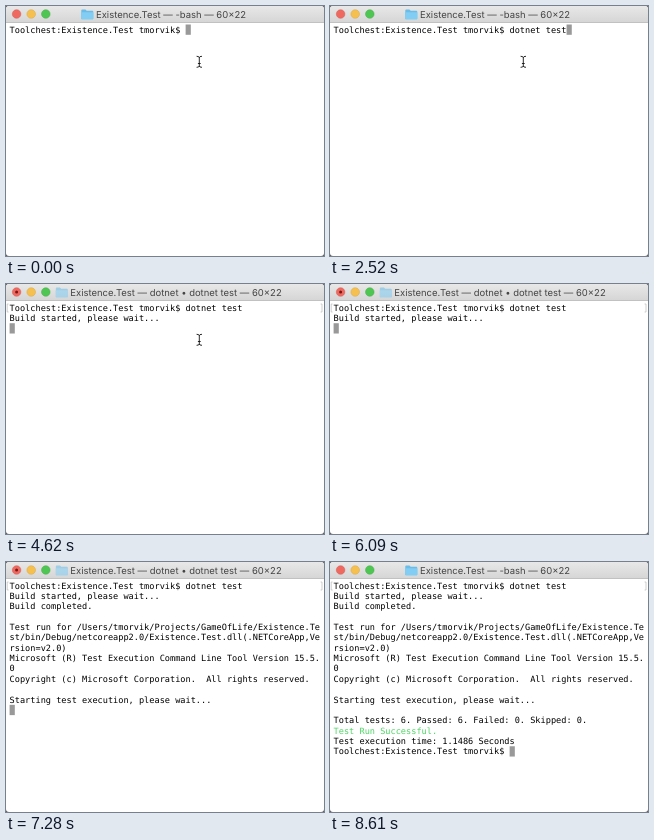
Animation, 318 px wide and 250 px high, one loop 8890 ms. Source, as an HTML page:

```html
<!DOCTYPE html>
<html lang="en">
<head>
<meta charset="utf-8">
<title>Terminal</title>
<style>
  html, body { margin: 0; width: 100%; height: 100%; overflow: hidden; background: #55555a; }
  svg { display: block; }
  text { white-space: pre; text-rendering: geometricPrecision; }
  #screen { font: 8.6px "DejaVu Sans Mono", monospace; fill: #000; }
  #title { font: 9.47px Inter, sans-serif; fill: #444; }
</style>
</head>
<body>
<svg width="318" height="250" viewBox="0 0 318 250">
  <defs>
    <linearGradient id="bar" x2="0" y2="1">
      <stop offset="0" stop-color="#e8e8e8"/>
      <stop offset="1" stop-color="#d6d6d6"/>
    </linearGradient>
    <clipPath id="window"><rect width="318" height="250" rx="3"/></clipPath>
  </defs>
  <g clip-path="url(#window)">
    <rect width="318" height="250" fill="#fff"/>
    <rect width="318" height="16" fill="url(#bar)"/>
    <rect y="16" width="318" height=".8" fill="#b2b2b2"/>
    <g stroke-width=".5">
      <circle cx="10.6" cy="8" r="4.3" fill="#ee6a60" stroke="#d5574e"/>
      <circle cx="25.2" cy="8" r="4.3" fill="#f5c04f" stroke="#dba73e"/>
      <circle cx="39.8" cy="8" r="4.3" fill="#4fc653" stroke="#42ac45"/>
    </g>
    <circle id="busy" cx="10.6" cy="8" r="1.5" fill="#7a1512"/>
    <g id="folder">
      <path d="M0 1.2q0-.9.9-.9h3.3l1.2 1.2h5.7q.9 0 .9.9v6.7q0 .9-.9.9H.9q-.9 0-.9-.9z" fill="#6abde8"/>
      <path d="M0 3h12v6.1q0 .9-.9.9H.9q-.9 0-.9-.9z" fill="#82cdf4"/>
    </g>
    <text id="title" y="11.8"></text>
    <path id="marks" d="M2.6 20H1.2v8H2.6M314.6 20h1.4v8H314.6" fill="none" stroke="#bbb" stroke-width=".7"/>
    <rect id="caret" width="5.2" height="10.3" fill="#999"/>
    <g id="screen"></g>
    <path id="mouse" d="M-2.3-5.5Q0-5.5 0-4.2Q0-5.5 2.3-5.5M0-4.2V4.2M-2.3 5.5Q0 5.5 0 4.2Q0 5.5 2.3 5.5M-1 1.7H1"
      fill="none" stroke="#111" stroke-width=".9" stroke-linecap="round"/>
  </g>
</svg>
<script>
const LOOP = 8890, COLS = 60, CELL = 5.177, ROW = 10.36, LEFT = 3.6, TOP = 18.5;
const PROMPT = 'Toolchest:Existence.Test tmorvik$ ';
const COMMAND = 'dotnet test';
const KEYS = [70, 210, 350, 700, 840, 910, 1260, 1470, 1610, 1750, 2520];
const ENTER = 3150, RUN = 3430, DONE = 8120;
const SUCCESS = 'Test Run Successful.';
const OUTPUT = [
  [4620, 'Build started, please wait...'],
  [6440, 'Build completed.', ''],
  [6510, 'Test run for /Users/tmorvik/Projects/GameOfLife/Existence.Test/bin/Debug/netcoreapp2.0/Existence.Test.dll(.NETCoreApp,Version=v2.0)'],
  [6580, 'Microsoft (R) Test Execution Command Line Tool Version 15.5.0',
         'Copyright (c) Microsoft Corporation.  All rights reserved.', ''],
  [6650, 'Starting test execution, please wait...'],
  [7910, '', 'Total tests: 6. Passed: 6. Failed: 0. Skipped: 0.'],
  [7980, SUCCESS],
  [8050, 'Test execution time: 1.1486 Seconds']
];
const MOVE = { start: 4830, end: 5390, step: 70, from: [193.3, 55.8], to: [283, 148] };

const $ = id => document.getElementById(id);
const show = (el, on) => el.setAttribute('visibility', on ? 'visible' : 'hidden');
const place = (el, x, y) => el.setAttribute('transform', `translate(${x} ${y})`);
const wrap = s => s.match(new RegExp(`.{1,${COLS}}`, 'g')) || [''];

const rows = Array.from({ length: 22 }, (_, i) => {
  const el = document.createElementNS('http://www.w3.org/2000/svg', 'text');
  el.setAttribute('x', LEFT);
  el.setAttribute('y', TOP + i * ROW + 8.1);
  return $('screen').appendChild(el);
});

function linesAt(t) {
  const lines = [PROMPT + COMMAND.slice(0, KEYS.filter(k => k <= t).length)];
  if (t < ENTER) return lines;
  for (const [at, ...text] of OUTPUT) {
    if (at <= t) lines.push(...text.flatMap(wrap));
  }
  lines.push(t >= DONE ? PROMPT : '');
  return lines;
}

function drawTitle(t) {
  const running = t >= RUN && t < DONE;
  $('title').textContent = `Existence.Test — ${running ? 'dotnet • dotnet test' : '-bash'} — 60×22`;
  $('title').setAttribute('x', running ? 64.3 : 90);
  place($('folder'), running ? 49.8 : 75.3, 3.3);
  $('folder').setAttribute('opacity', running ? .55 : 1);
  show($('busy'), running);
}

function drawMouse(t) {
  const { start, end, step, from, to } = MOVE;
  const ticks = Math.max(0, Math.floor((t - start) / step) + 1);
  const p = Math.min(1, ticks * step / (end - start));
  const e = p * p * (3 - 2 * p);
  place($('mouse'), ...from.map((a, i) => a + (to[i] - a) * e));
  show($('mouse'), t < end);
}

function draw(t) {
  const lines = linesAt(t), last = lines.length - 1;
  rows.forEach((el, i) => {
    const s = lines[i] || '';
    if (el.textContent !== s) el.textContent = s;
    el.setAttribute('fill', s === SUCCESS ? '#4fd765' : '#000');
  });
  $('caret').setAttribute('x', LEFT + lines[last].length * CELL);
  $('caret').setAttribute('y', TOP + last * ROW);
  show($('marks'), t >= ENTER);
  drawTitle(t);
  drawMouse(t);
}

const begin = performance.now();
function tick() {
  draw((performance.now() - begin) % LOOP);
  requestAnimationFrame(tick);
}
tick();
</script>
</body>
</html>
```
